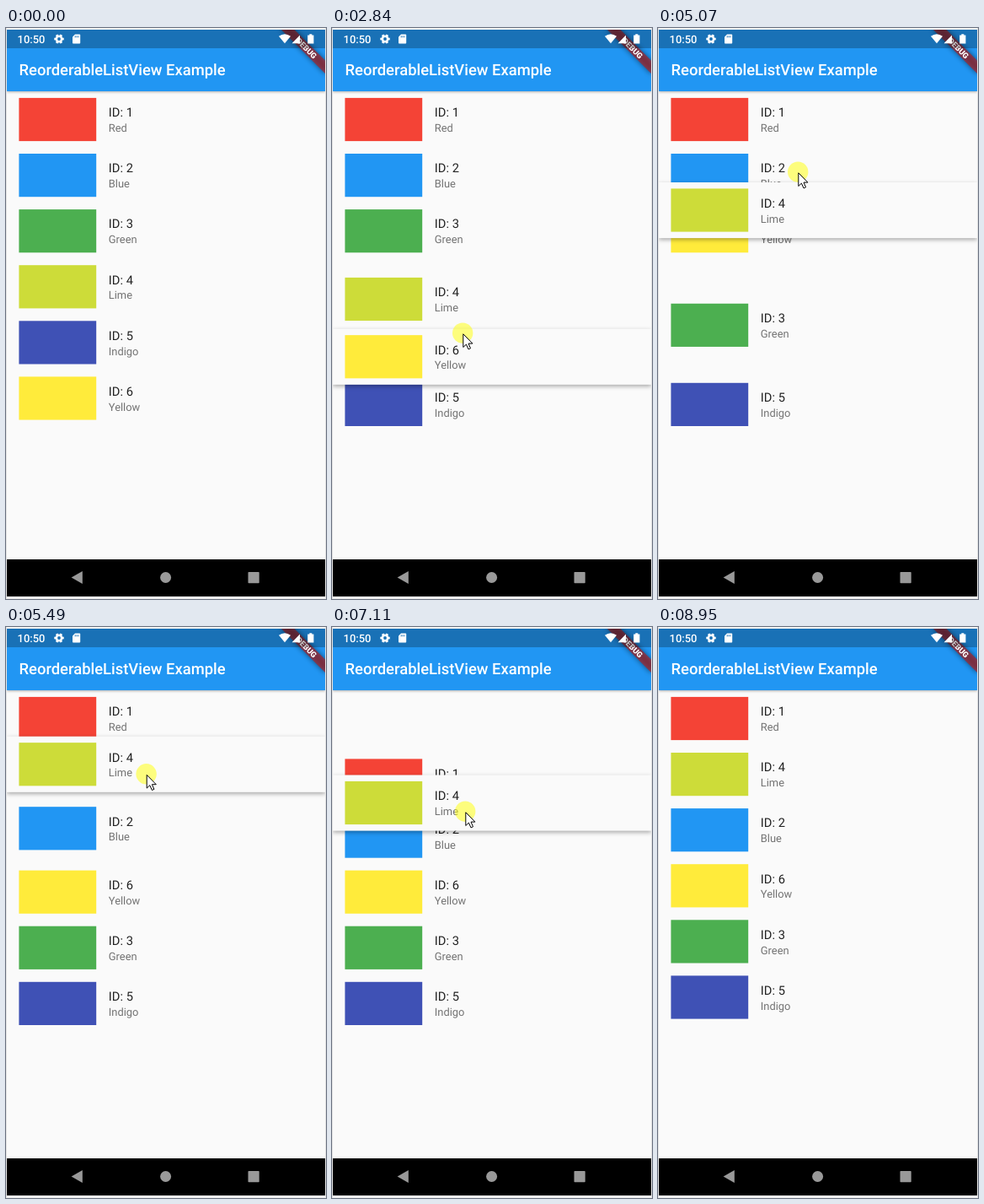
Animation of 380 by 677 pixels, one loop 9560 ms. Source, as an HTML page:

```html
<!DOCTYPE html>
<html lang="en">
<head>
<meta charset="utf-8">
<title>Reorderable list</title>
<style>
  html, body { margin: 0; width: 100%; height: 100%; overflow: hidden; background: #fff; }
  svg { display: block; width: 380px; height: 677px; font-family: Roboto, sans-serif; text-rendering: geometricPrecision; }
  .id { font-size: 14.7px; fill: rgba(0, 0, 0, .87); }
  .name { font-size: 12.9px; fill: rgba(0, 0, 0, .54); }
  .card { fill: none; }
  .lifted .card { fill: #fafafa; filter: drop-shadow(0 2.5px 2.5px rgba(0, 0, 0, .33)); }
  .bar { filter: drop-shadow(0 1.5px 1.5px rgba(0, 0, 0, .3)); }
</style>
</head>
<body>
<svg viewBox="0 0 380 677">
  <defs>
    <clipPath id="screen"><rect x="1" y="2" width="378" height="672"/></clipPath>
    <filter id="soft" x="-30%" y="-150%" width="160%" height="400%"><feGaussianBlur stdDeviation="3"/></filter>
  </defs>
  <rect width="380" height="677" fill="#f3f3f3"/>
  <path d="M.5 0V677M379.5 0V677" stroke="#e4e4e4"/>
  <g clip-path="url(#screen)">
    <rect x="1" y="2" width="378" height="628" fill="#fafafa"/>
    <g id="list"></g>
    <rect class="bar" x="1" y="2" width="378" height="73" fill="#2196f3"/>
    <text x="15.6" y="56.2" font-size="18.4" font-weight="500" fill="#fff">ReorderableListView Example</text>

    <g transform="translate(379 2) rotate(45)">
      <rect x="-37" y="25.8" width="74" height="11" opacity=".5" filter="url(#soft)"/>
      <rect x="-37" y="25.8" width="74" height="11" fill="#b71c1c" fill-opacity=".63"/>
      <text y="34.7" font-size="9.4" font-weight="900" fill="#fff" text-anchor="middle">DEBUG</text>
    </g>
    <rect x="1" y="2" width="378" height="22" opacity=".25"/>

    <g fill="#fff">
      <text x="13.6" y="17.7" font-size="12.9" font-weight="500">10:50</text>
      <g fill="none" stroke="#fff">
        <circle cx="63" cy="13" r="3.2" stroke-width="2.6"/>
        <circle cx="63" cy="13" r="4.8" stroke-width="1.9" pathLength="12" stroke-dasharray="1.1 .9" stroke-dashoffset=".55"/>
      </g>
      <path d="M82 7.5h5.3q.9 0 .9.9v9.2q0 .9-.9.9h-7.4q-.9 0-.9-.9V10.6z"/>
      <path d="M82.2 9.3v2M84 9.3v2M85.9 9.3v2" stroke="#1971b6" stroke-width=".9"/>
      <path d="M324 9.8Q331 4.8 338 9.8L331 18.3z"/>
      <path d="M349 8.4V18.3H339.5z"/>
      <path d="M360.3 7.2h3v1.2h2.1v10h-7.2v-10h2.1z"/>
    </g>

    <rect x="1" y="630" width="378" height="44"/>
    <g fill="#999">
      <path d="M77.6 651.5L90.8 643.9V659.1z"/>
      <circle cx="189.6" cy="651.5" r="6.5"/>
      <rect x="287.5" y="645" width="13.2" height="13.2" rx=".8"/>
    </g>
  </g>
  <g id="pointer">
    <circle id="press" cx=".2" cy="-.3" r="12.2" fill="#ff0" fill-opacity=".5"/>
    <path d="M.8 .8V16.5L4.4 13.1L7 18.9L9.5 17.8L7 12.1H11.9z" fill="#fff" stroke="#000"/>
  </g>
</svg>
<script>
// All times below are in beats; the picture changes only on a beat.
const BEAT = 9560 / 47, LEAD = 28;
const TOP = 75.5, PITCH = 66.1, GAP = 73.5, LAG = .75;
const $ = id => document.getElementById(id);

const items = [['Red', '#f44336'], ['Blue', '#2196f3'], ['Green', '#4caf50'],
  ['Lime', '#cddc39'], ['Indigo', '#3f51b5'], ['Yellow', '#ffeb3b']];
$('list').innerHTML = items.map(([name, color], i) => `<g>
  <rect class="card" x="1" width="378" height="${PITCH}"/>
  <rect x="15.4" y="7.4" width="91.8" height="51.2" fill="${color}"/>
  <text class="id" x="121.8" y="29.8">ID: ${i + 1}</text>
  <text class="name" x="121.8" y="47.7">${name}</text></g>`).join('');
const rows = [...$('list').children];

// Pointer: beat, x, y
const path = [[1, 166, 331], [6, 153, 440], [12, 153, 440], [17, 158, 245], [18, 158, 348],
  [20, 180, 319], [23, 180, 319], [25, 166, 171], [30, 167, 180], [34, 158, 219],
  [35, 158, 219], [41, 157, 205], [43, 220, 655]];

// Open slot: beat, index
const slot = [[12, 5], [17, 2], [23, 4], [24.45, 4], [28, 0], [35, 0], [37, 1]];

// Each drag moves row `index` to position `to`
const drags = [{index: 5, to: 2, press: 6, lift: 9, drop: 17, grip: 34.5},
  {index: 3, to: 1, press: 20, lift: 23, drop: 41, grip: 43.5}];

function at(keys, t, col) {
  const i = keys.findIndex(k => k[0] > t);
  if (i <= 0) return keys.at(i)[col];
  const a = keys[i - 1], b = keys[i];
  return a[col] + (b[col] - a[col]) * (t - a[0]) / (b[0] - a[0]);
}

const move = (el, x, y) => el.setAttribute('transform', `translate(${x} ${y})`);
const show = (el, on) => el.style.display = on ? '' : 'none';
const within = (t, a, b) => t >= a && t < b;

function draw(t) {
  const order = [0, 1, 2, 3, 4, 5];
  for (const d of drags) {
    if (t < d.drop) continue;
    order.splice(order.indexOf(d.index), 1);
    order.splice(d.to, 0, d.index);
  }
  const drag = drags.find(d => within(t, d.lift, d.drop));
  const gap = drag ? GAP : drags.some(d => t === d.drop) ? GAP / 10 : 0;
  const open = at(slot, t, 1);

  order.filter(n => !drag || n !== drag.index).forEach((n, i) =>
    move(rows[n], 0, TOP + i * PITCH + gap * Math.min(1, Math.max(0, i + 1 - open))));
  rows.forEach((row, n) => row.classList.toggle('lifted', !!drag && drag.index === n));
  if (drag) {
    const row = rows[drag.index];
    move(row, 0, at(path, t - LAG, 2) - drag.grip);
    if (row.nextSibling) $('list').append(row);
  }

  move($('pointer'), at(path, t, 1), at(path, t, 2));
  show($('pointer'), within(t, 1, 44));
  show($('press'), drags.some(d => within(t, d.press, d.drop)));
}

function frame() {
  draw(Math.floor((performance.now() + LEAD) / BEAT) % 47);
  requestAnimationFrame(frame);
}
frame();
</script>
</body>
</html>
```
